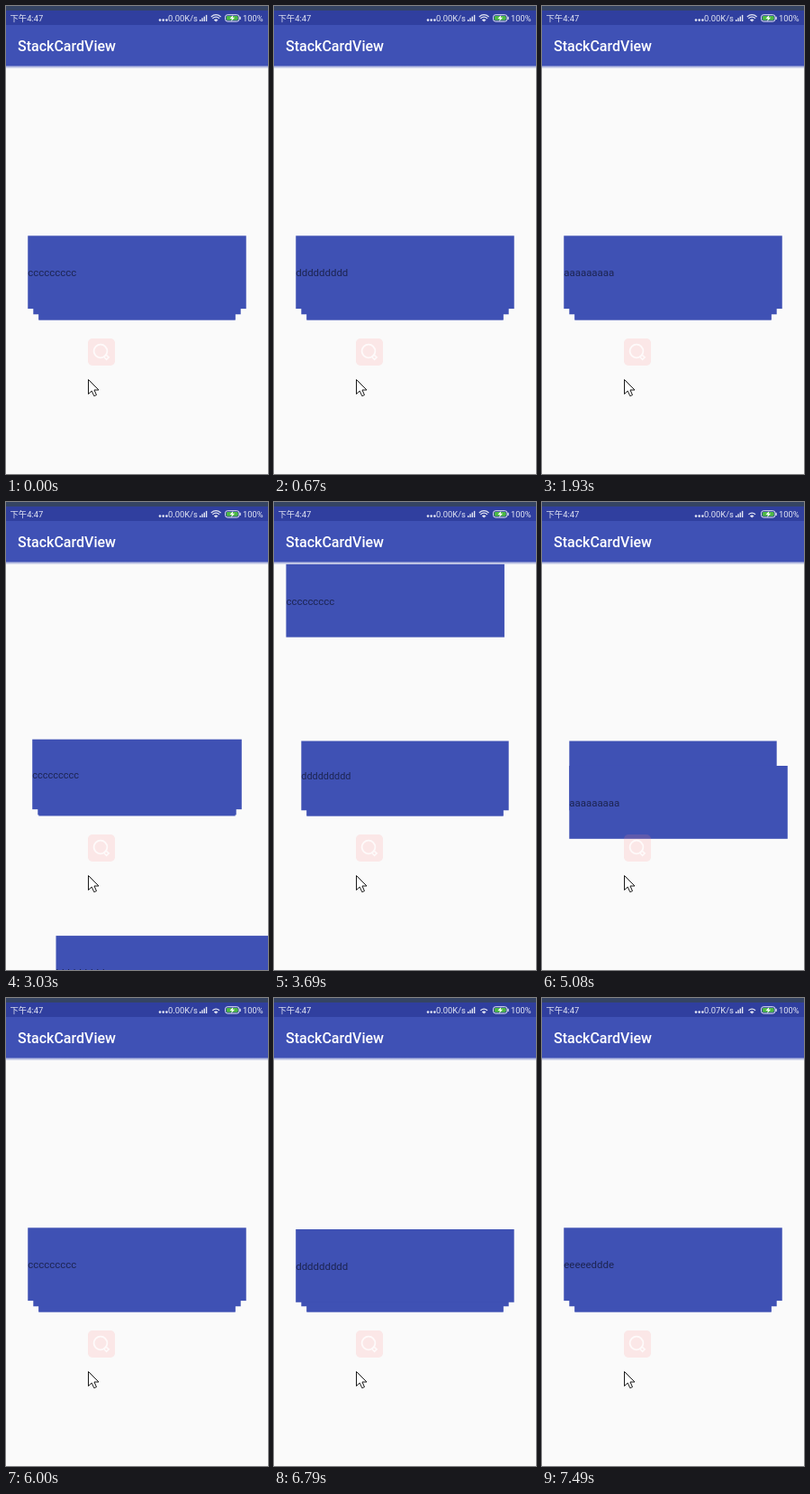
Recreate the animation shown at these times as an HTML page. Size 291 px wide and 518 px high, loop 8 s.

```html
<!DOCTYPE html>
<html lang="zh">
<head>
<meta charset="utf-8">
<title>StackCardView</title>
<style>
html, body { margin: 0; width: 100%; height: 100%; overflow: hidden; background: #fafafa; }
svg { display: block; width: 291px; height: 518px; }
text { font-family: Roboto, "Noto Sans CJK SC", "Noto Sans CJK", sans-serif; }
.status { font-size: 9.4px; fill: #e3e6f4; }
.label { font-size: 11.45px; fill: #1d2553; }
.title { font-size: 16px; font-weight: 500; fill: #fff; }
</style>
</head>
<body>
<svg viewBox="0 0 291 518">
  <defs>
    <linearGradient id="shade" x1="0" y1="0" x2="0" y2="1">
      <stop offset="0" stop-color="#3f51b5" stop-opacity=".6"/>
      <stop offset="1" stop-color="#3f51b5" stop-opacity="0"/>
    </linearGradient>
  </defs>
  <rect width="291" height="518" fill="#fafafa"/>
  <g id="stack"></g>

  <rect y="66" width="291" height="3.5" fill="url(#shade)"/>
  <rect width="291" height="66.3" fill="#3f51b5"/>
  <rect width="291" height="21" fill="#303f9f"/>
  <rect width="291" height="5" fill="#354463"/>
  <text class="title" x="13" y="50">StackCardView</text>

  <text class="status" x="4.4" y="17">下午4:47</text>
  <g id="signal" fill="#e3e6f4"></g>
  <text class="status" id="speed" x="180" y="17">0.00K/s</text>
  <g fill="none" stroke="#e3e6f4" stroke-width="1.3">
    <path id="outer" d="M227.8 11.9q5.4-4.4 10.8 0"/>
    <path d="M229.4 13.8q3.8-3.2 7.6 0"/>
    <path d="M231.2 15.5q2-1.7 4 0L233.2 17z" fill="#e3e6f4" stroke-width=".7"/>
  </g>
  <rect x="243.5" y="9.7" width="15.5" height="7.4" rx="2.6" fill="none" stroke="#e3e6f4"/>
  <rect x="259.3" y="11.8" width="1.4" height="3.2" fill="#e3e6f4"/>
  <rect x="244.8" y="11" width="12.9" height="4.8" rx="1.4" fill="#4cb944"/>
  <path d="M252.3 10l-3.8 4h2.4l-.8 3 4-4.2h-2.4z" fill="#fff"/>
  <text class="status" x="263" y="17">100%</text>

  <rect x="91" y="368" width="30" height="30" rx="5" fill="#f88" opacity=".17"/>
  <g fill="none" stroke="#fff" stroke-width="1.8" opacity=".8">
    <circle cx="105" cy="382" r="7.4"/>
    <path d="M111 386.2l3.2 2.6-2.6 2.6-2.8-3.2z" stroke-width="1.5"/>
  </g>
  <path d="M91.5 413.5v16l3.7-3.4 2.6 5.6 2.7-1.2-2.5-5.5h5z" fill="#fff" stroke="#1a1a1a" stroke-linejoin="round"/>
</svg>
<script>
const LOOP = 8000, FLING = 150, WAIT = 126, GROW = 140, BACK = 280;
const W = 242.5, H = 80.8, CX = 145.5, CY = 294.7, STEP = 8.2, SHRINK = 0.05;
const FIRST = 2;

// Each swipe throws the top card; dx and dy are its shift after FLING ms
const swipes = [
  { at: 400, dx: 25, dy: -230 },
  { at: 1060, dx: -10, dy: 250 },
  { at: 1630, dx: -290, dy: -50 },
  { at: 2210, dx: 290, dy: -45 },
  { at: 2880, dx: 31, dy: 224 },
  { at: 3570, dx: -14, dy: -240 },
  { at: 4080, dx: -290, dy: -10 },
  { at: 4630, dx: 290, dy: 10 },
  { at: 5050, dx: 40, dy: 250 },
  { at: 5730, dx: 40, dy: -240 },
  { at: 6270, dx: -290, dy: -45 },
  { at: 6790, dx: -6, dy: 149, back: true },
  { at: 7210, dx: 50, dy: -240 }
];

const $ = id => document.getElementById(id);

function add(parent, tag, attrs) {
  const el = document.createElementNS('http://www.w3.org/2000/svg', tag);
  for (const k in attrs) el.setAttribute(k, attrs[k]);
  return parent.appendChild(el);
}

function label(n) {
  const c = 'abcde'[n % 5];
  return c === 'e' ? 'eeeeeddde' : c.repeat(9);
}

for (let i = 0; i < 3; i++) add($('signal'), 'circle', { cx: 171 + 3.7 * i, cy: 15.6, r: 1.3 });
for (let i = 0; i < 4; i++) {
  const height = 2 + 1.7 * i;
  add($('signal'), 'rect', { x: 215 + 2.3 * i, y: 17 - height, width: 1.4, height });
}

// Back card first, so the top card is painted last
const cards = [3, 2, 1, 0].map(slot => {
  const g = add($('stack'), 'g', {});
  add(g, 'rect', { x: -W / 2, y: -H / 2, width: W, height: H, fill: '#3f51b4' });
  const text = add(g, 'text', { class: 'label', x: -W / 2, y: 4.6 });
  return { slot, g, text };
});

function draw(t) {
  let top = FIRST, rise = 0, shift = 0, dx = 0, dy = 0;
  for (const s of swipes) {
    const ms = t - s.at;
    if (ms < 0) break;
    if (ms >= (s.back ? BACK : WAIT + GROW)) {
      if (!s.back) top++;
      continue;
    }
    ({ dx, dy } = s);
    shift = s.back ? Math.sin(Math.PI * ms / BACK) : (ms / FLING) ** 1.2;
    rise = s.back ? 0 : Math.max(0, (ms - WAIT) / GROW);
  }
  for (const { slot, g, text } of cards) {
    const depth = slot ? Math.min(2, slot - rise) : 0;
    const x = CX + (slot ? 0 : dx * shift);
    const y = CY + depth * STEP + (slot ? 0 : dy * shift);
    g.setAttribute('transform', `translate(${x} ${y}) scale(${1 - depth * SHRINK})`);
    text.textContent = label(top + slot);
  }
  $('speed').textContent = t < 7000 ? '0.00K/s' : '0.07K/s';
  $('outer').style.display = t < 4200 ? '' : 'none';
}

const begin = performance.now();
function tick() {
  draw((performance.now() - begin) % LOOP);
  requestAnimationFrame(tick);
}
tick();
</script>
</body>
</html>
```
